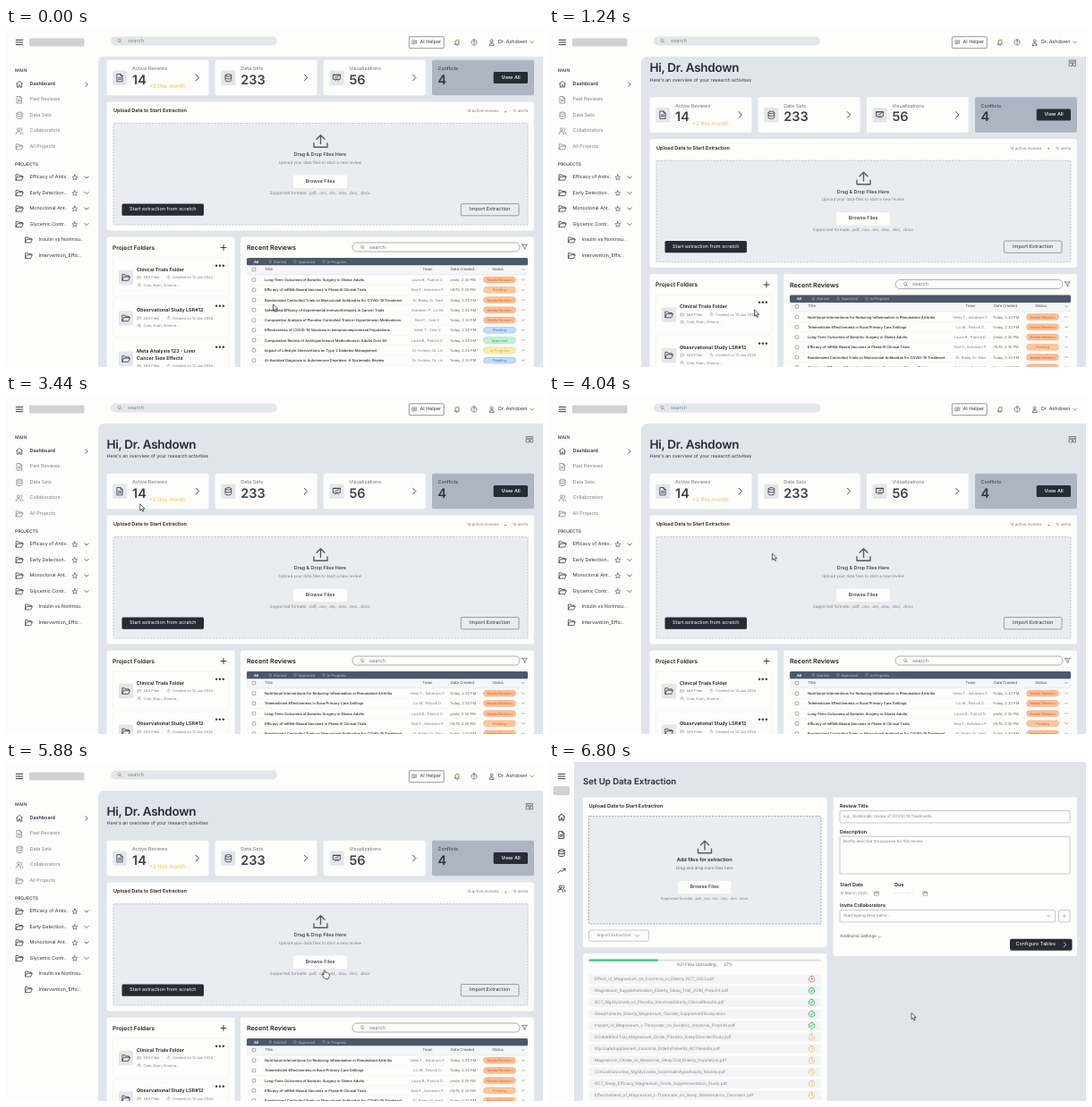
Recreate the animation shown at these times as an HTML page. Size 600 px wide and 379 px high, loop 7.36 s.

```html
<!DOCTYPE html>
<html lang="en">
<head>
<meta charset="utf-8">
<title>Review dashboard</title>
<style>
  html, body { margin: 0; width: 100%; height: 100%; overflow: hidden; background: #fdfdfb; }
  svg { display: block; width: 100vw; height: 100vh; }
  text { font-family: Inter, sans-serif; dominant-baseline: central; text-rendering: geometricPrecision; white-space: pre; }
  .icon { fill: none; stroke-linecap: round; stroke-linejoin: round; }
</style>
</head>
<body>
<svg id="stage" viewBox="0 0 600 379"></svg>
<script>
const WHITE = '#fdfdfb', PANEL = '#e0e5eb', ZONE = '#e9ecf0', DARK = '#262b34', INK = '#2e333b', GREY = '#7b7e83';
const LOOP = 7360;

const ICONS = {
  menu: 'M2 5H22M2 12H22M2 19H22',
  home: 'M3 11 12 3l9 8M5 9.5V21h5v-6h4v6h5V9.5',
  doc: 'M5 2h9l5 5v15H5zM14 2v5h5M8 12h8M8 16h8',
  data: 'M4 5a8 3 0 0 1 16 0a8 3 0 0 1-16 0v14a8 3 0 0 0 16 0V5M4 12a8 3 0 0 0 16 0',
  people: 'M9 11a4 4 0 1 0 0-8a4 4 0 0 0 0 8zM2 21v-2a5 5 0 0 1 5-5h4a5 5 0 0 1 5 5v2M16 3a4 4 0 0 1 0 8M19 14a5 5 0 0 1 3 5v2',
  folder: 'M2 19V4h7l2 3h9v3M2 19l4-9h17l-4 9z',
  star: 'M12 2l3 7 7 .6-5.3 4.8 1.6 7.1L12 17.8l-6.3 3.7 1.6-7.1L2 9.6 9 9z',
  right: 'M8 4l8 8-8 8',
  down: 'M4 8l8 8 8-8',
  search: 'M10 17a7 7 0 1 0 0-14a7 7 0 0 0 0 14zM15 15l6 6',
  chat: 'M3 4h18v13H10l-5 4v-4H3zM8 9h8M8 13h5',
  bell: 'M6 17V10a6 6 0 0 1 12 0v7l2 2H4zM10 22h4',
  help: 'M12 2a10 10 0 1 0 .01 0zM9 9.5a3 3 0 1 1 4.5 2.6q-1.5.9-1.5 2.4M12 17.5v.6',
  user: 'M12 12a4.5 4.5 0 1 0 0-9a4.5 4.5 0 0 0 0 9zM4 21a8 6 0 0 1 16 0z',
  upload: 'M12 16V3M6 9l6-6 6 6M2 15v6h20v-6',
  board: 'M3 4h18v12H3zM2 4h20M8 20l4-4 4 4M8 12l3-3 2 2 3-4',
  layout: 'M2 3h20v5H2zM2 12h9v9H2zM15 12h7v9h-7z',
  trend: 'M2 18l7-7 4 4 9-9M16 6h6v6',
  filter: 'M2 3h20l-8 9v8l-4-3v-5z',
  plus: 'M12 3v18M3 12h18',
  clock: 'M12 2a10 10 0 1 0 .01 0zM12 6v6l4 2',
  check: 'M12 2a10 10 0 1 0 .01 0zM7 12l4 4 6-8',
  calendar: 'M3 5h18v16H3zM3 10h18M8 2v5M16 2v5',
};

// y is the middle of the capitals
const text = (x, y, size, str, color = INK, weight = 400, anchor = 'start', extra = '') =>
  `<text x="${x}" y="${y}" font-size="${size}" fill="${color}" font-weight="${weight}" text-anchor="${anchor}" ${extra}>${str}</text>`;
const centred = (x, y, size, str, color, weight) => text(x, y, size, str, color, weight, 'middle');
const box = (x, y, w, h, fill, r = 0, stroke = 'none', extra = '') =>
  `<rect x="${x}" y="${y}" width="${w}" height="${h}" rx="${r}" fill="${fill}" stroke="${stroke}" stroke-width=".6" ${extra}/>`;
const icon = (name, x, y, size, color = INK, weight = 1.9) =>
  `<path class="icon" d="${ICONS[name]}" stroke="${color}" stroke-width="${weight}" transform="translate(${x} ${y}) scale(${size / 24}) translate(-12 -12)"/>`;
const line = (x1, y, x2, color) => `<path d="M${x1} ${y}H${x2}" stroke="${color}" stroke-width=".5"/>`;
const dropZone = (x, y, w, h, color) => box(x, y, w, h, ZONE, 1, color, 'stroke-dasharray="2 1.5"');
const FORMATS = 'Supported formats: .pdf, .csv, .xls, .xlsx, .doc, .docx';

function header() {
  return icon('menu', 15, 16, 9, INK, 2.6)
    + box(117, 9.5, 186, 10, '#e3e6ea', 5) + icon('search', 127, 14.3, 5.5, '#666') + text(136, 14.3, 5.7, 'search', '#85888d')
    + box(450.3, 9.7, 39, 13, 'none', 1.5, '#555') + icon('chat', 456.5, 16, 6) + text(462.5, 16, 5.4, 'AI Helper')
    + icon('bell', 504, 16, 7.5) + `<circle cx="505.6" cy="13.8" r="1.3" fill="#f0c23c"/>`
    + icon('help', 523, 16, 7.5) + icon('user', 542.7, 16, 8) + text(550, 16, 5.4, 'Dr. Ashdown') + icon('down', 587.5, 16, 5.5, INK, 2.6);
}

function sidebar() {
  const links = [['home', 'Dashboard'], ['doc', 'Past Reviews'], ['data', 'Data Sets'], ['people', 'Collaborators'], ['folder', 'All Projects']];
  const projects = ['Efficacy of Antiv..', 'Early Detection..', 'Monoclonal Ant..', 'Glycemic Contr..'];
  const subs = ['Insulin vs NonInsu..', 'Intervention_Effic..'];
  return text(10, 48.3, 4.9, 'MAIN', '#44484e', 600) + text(10, 153, 4.9, 'PROJECTS', '#44484e', 600)
    + links.map(([name, label], i) => {
        const y = 62.8 + i * 17.5, color = i ? GREY : INK;
        return icon(name, 15, y, 9, color) + text(26.5, y, 5.4, label, color, i ? 400 : 600);
      }).join('') + icon('right', 90, 63, 7, INK, 2.6)
    + projects.map((label, i) => {
        const y = 167 + i * 17.5;
        return icon('folder', 15, y, 9.5) + text(26.5, y, 5.3, label) + icon('star', 76.8, y, 7) + icon('down', 90, y, 6.5, INK, 2.6);
      }).join('')
    + subs.map((label, i) => icon('folder', 25.3, 237 + i * 17.5, 9) + text(36.5, 237 + i * 17.5, 5.4, label)).join('');
}

function statCards() {
  const cards = [['doc', 'Active Reviews', 14], ['data', 'Data Sets', 233], ['board', 'Visualizations', 56]];
  return cards.map(([name, label, count], i) => {
      const x = 112.5 + i * 121.2;
      return box(x, 87.7, 114, 39.5, WHITE, 2) + box(x + 6.7, 99.5, 16, 16.5, '#e3e7ec', 1.5) + icon(name, x + 14.7, 107.7, 10)
        + text(x + 28.5, 98, 5.5, label, '#70747a') + text(x + 28.5, 110, 14.5, count, '#3b424d', 600)
        + icon('right', x + 101.3, 107.5, 10, INK, 2.2);
    }).join('')
    + text(160, 117, 6.3, '+2 this month', '#f3bd4e')
    + box(476, 87.7, 114, 39.5, '#aeb5c2', 2) + text(482.5, 98, 5.4, 'Conflicts') + text(482.5, 110, 14.5, 4, '#2f3641', 600)
    + box(544.7, 101, 38.3, 13, DARK, 1.5) + centred(564, 107.5, 5.5, 'View All', WHITE, 500);
}

function uploadCard() {
  return box(112.5, 134.5, 477.5, 144, WHITE, 3)
    + text(120, 145, 5.5, 'Upload Data to Start Extraction', '#222', 600)
    + text(515, 145.5, 4.4, '14 active reviews', GREY) + centred(558, 145.5, 4.8, '•', '#555') + text(566, 145.5, 4.4, '12 alerts', GREY)
    + dropZone(120, 158.6, 463, 113.4, '#a3a7ad')
    + icon('upload', 351.5, 178.5, 18, '#555b64', 1.8)
    + centred(351, 194, 5.4, 'Drag &amp; Drop Files Here', INK, 500)
    + centred(351, 203, 4.5, 'Upload your data files to start a new review', GREY)
    + box(321, 216.5, 60, 14.5, WHITE, 1.5) + centred(351, 223.7, 5.4, 'Browse Files', INK, 500)
    + centred(350.7, 237, 4.6, FORMATS, GREY)
    + box(129.5, 248.5, 91.5, 13.3, DARK, 1.5) + centred(175.3, 255.2, 5.5, 'Start extraction from scratch', WHITE)
    + box(508.3, 248.5, 64.7, 13.3, 'none', 1.5, '#666') + centred(540.7, 255.2, 5.6, 'Import Extraction');
}

function folderCard() {
  const folders = [['Clinical Trials Folder'], ['Observational Study LSR#12'], ['Meta Analysis 123 - Liver', 'Cancer Side Effects']];
  return box(112.5, 285.5, 143, 200, WHITE, 3) + text(119, 297.5, 6.5, 'Project Folders', '#222', 600) + icon('plus', 243, 297.5, 8, '#222', 2.6)
    + folders.map((lines, i) => {
        const y = 322.7 + i * 45.5, meta = y + 8 * lines.length;
        return box(119.5, y - 14, 129.5, 43, 'none', 2, '#f0f1f2') + centred(239, y - 6, 8, '•••', '#333', 700)
          + box(126, y, 16, 16.5, '#e3e7ec', 1.5) + icon('folder', 134, y + 8.3, 10)
          + lines.map((part, n) => text(146, y + n * 8, 5.45, part, '#222', 600)).join('')
          + icon('folder', 148.8, meta, 4.5, GREY) + text(153.5, meta, 4.1, '345 Files', GREY)
          + icon('clock', 181.5, meta, 4, GREY) + text(186, meta, 4, 'Created on 12 Jan 2024', GREY)
          + icon('people', 148.8, meta + 8.5, 4.5, GREY) + text(153.5, meta + 8.5, 4, 'Cole, Evan, Simone...', GREY);
      }).join('');
}

const PILLS = {
  revision: ['Needs Revision', '#fdbf94', '#cf6527'], late: ['Pending', '#fdc79c', '#cf6527'], pending: ['Pending', '#c3dcfb', '#3f74c4'],
  approved: ['Approved', '#bdf3d3', '#35a56b'], progress: ['In Progress', '#fcecab', '#d6a93a'],
};
const REVIEWS = [
  ['Nutritional Interventions for Reducing Inflammation in Rheumatoid Arthritis', 'Velez T., Ashdown P.', 'Today', 'revision'],
  ['Telemedicine Effectiveness in Rural Primary Care Settings', 'Liv M., Patrick D.', 'Today', 'revision'],
  ['Long-Term Outcomes of Bariatric Surgery in Obese Adults', 'Laura B., Patrick D.', 'yeste', 'revision'],
  ['Efficacy of mRNA-Based Vaccines in Phase III Clinical Trials', 'Ned F., Ashdown P.', '05/15', 'late'],
  ['Randomized Controlled Trials on Monoclonal Antibodies for COVID-19 Treatment', 'Dr. Blake, Dr. Ned', 'Today', 'revision'],
  ['Safety and Efficacy of Experimental Immunotherapies in Cancer Trials', 'Ashdown P., Liv M.', 'Today', 'revision'],
  ['Comparative Analysis of Placebo-Controlled Trials in Hypertension Medications', 'Ned F., Cole V.', 'Today', 'revision'],
  ['Effectiveness of COVID-19 Vaccines in Immunocompromised Populations', 'Velez T., Cole V.', 'Today', 'pending'],
  ['Comparative Review of Antihypertensive Medications in Adults Over 60', 'Laura B., Patrick D.', 'Today', 'approved'],
  ['Impact of Lifestyle Interventions on Type 2 Diabetes Management', 'Dr. Holden, Dr. Liv', 'Today', 'progress'],
  ['AI-Assisted Diagnosis in Autoimmune Disorders: A Systematic Review', 'Dr. Holden, Dr. Liv', 'Today', 'pending'],
];
const checkbox = y => box(275.2, y - 1.8, 3.6, 3.6, 'none', .5, '#777');

function reviewCard() {
  const tab = (name, x, label) => icon(name, x, 313.2, 4, '#b9c1cb') + text(x + 3.7, 313.2, 4, label, '#b9c1cb');
  const rows = REVIEWS.map(([title, team, day, status], i) => {
    const y = 333.6 + i * 11.25, [label, fill, color] = PILLS[status];
    return checkbox(y) + text(289, y, 4, title, '#222', 500) + centred(471, y, 4, team, GREY) + centred(510.5, y, 4, day + ', 2:30 PM', '#666')
      + box(533.5, y - 3.5, 36, 7, fill, 3.5, color, 'stroke-opacity=".35"') + centred(551.5, y, 3.9, label, color)
      + icon('down', 578, y, 4.5, '#555', 2.6) + line(269, y + 5.6, 583, '#eceef0');
  }).join('');
  return box(262, 285.5, 328, 200, WHITE, 3) + text(269, 297.5, 7.2, 'Recent Reviews', '#222', 600)
    + box(387, 292, 187, 10, 'none', 5, '#777') + icon('search', 398.5, 297, 5.5, '#555') + text(406, 297, 5.7, 'search', GREY)
    + icon('filter', 579.5, 297, 7)
    + box(269, 309, 314, 8.5, '#4b586b', 1.5) + text(277, 313.2, 4, 'All', WHITE, 700)
    + tab('star', 295.3, 'Starred') + tab('check', 323, 'Approved') + tab('clock', 355, 'In Progress')
    + box(269, 317.5, 314, 10, '#f5f6f7')
    + checkbox(322) + text(289.5, 322, 4.2, 'Title', '#444') + centred(471, 322, 4.2, 'Team', '#444') + centred(510, 322, 4.2, 'Date Created', '#444')
    + centred(549.5, 322, 4.2, 'Status', '#444') + icon('down', 578, 322, 4.5, '#555', 2.6) + line(269, 327.6, 583, '#dcdfe3')
    + `<g clip-path="url(#tableClip)"><g id="rows">${rows}</g></g>`;
}

function greeting() {
  return text(112.5, 55.7, 13.5, 'Hi, Dr. Ashdown', '#262b34', 600, 'start', 'letter-spacing="-.3"')
    + text(112.5, 69.2, 5.25, "Here's an overview of your research activities", '#333')
    + icon('layout', 585, 49.7, 8.5, '#555');
}

const FILES = [
  'Effect_of_Magnesium_on_Insomnia_in_Elderly_RCT_2023.pdf',
  'Magnesium_Supplementation_Elderly_Sleep_Trial_JGIM_Preprint.pdf',
  'RCT_MgGlycinate_vs_Placebo_InsomniaElderly_ClinicalResults.pdf',
  'SleepPatients_Elderly_Magnesium_Taurate_SupplementStudy.docx',
  'Impact_of_Magnesium_L-Threonate_on_Geriatric_Insomnia_Preprint.pdf',
  'DoubleBlindTrial_Magnesium_Oxide_Placebo_SleepDisorderStudy.pdf',
  'GlycinateSupplement_Insomnia_ElderlyPatients_RCTResults.pdf',
  'Magnesium_Citrate_vs_Melatonin_SleepTrial_Elderly_Population.pdf',
  'ClinicalOutcomes_MgGlycinate_InsomniaInAgedAdults_Review.pdf',
  'RCT_Sleep_Efficacy_Magnesium_Oxide_Supplementation_Study.pdf',
  'Effectiveness_of_Magnesium_L-Threonate_on_Sleep_Maintenance_Disorders.pdf',
];

function uploadPage() {
  const files = FILES.map((name, i) => {
    const y = 242.6 + i * 13;
    const status = i == 0 ? icon('clock', 293.5, y, 8, '#d9707a', 2.4) : i < 5 ? icon('check', 293.5, y, 8, '#2fb866', 2.6) : icon('clock', 293.5, y, 8, '#efb84f', 2.2);
    return box(44.5, y - 5.2, 259.5, 10.4, '#f3f4f5', 1) + text(51, y, 4.65, name, '#85888d') + status;
  }).join('');
  return text(38, 22.5, 9.6, 'Set Up Data Extraction', '#262b34', 600)
    + box(38, 39.5, 272.5, 167.7, WHITE, 3) + text(44.5, 50, 5.55, 'Upload Data to Start Extraction', '#222', 600)
    + dropZone(44.5, 60.6, 259.5, 120.4, '#6c7076')
    + icon('upload', 174, 95, 18, '#555b64', 1.8)
    + centred(173.7, 110.3, 5.6, 'Add files for extraction', '#222', 600) + centred(173.7, 119, 4.5, 'Drag and drop more files here', '#666')
    + box(144, 133, 59.5, 14.3, WHITE, 1.5) + centred(173.7, 140.2, 5.4, 'Browse Files', INK, 500)
    + centred(173.5, 152.6, 4, FORMATS, GREY)
    + box(44.5, 188, 67, 12.3, 'none', 2, '#a5a8ad') + text(53.5, 194.2, 4.7, 'Import Extraction', GREY) + icon('down', 98.5, 194.2, 6.5, '#777', 2.4)
    + box(38, 214, 272.5, 200, WHITE, 3) + box(44.5, 220.5, 259.5, 2.3, '#dfe2e5', 1.1) + box(44.5, 220.5, 77.5, 2.3, '#41c77f', 1.1)
    + text(143, 227.3, 4.75, 'Files Uploading...'.replace(/^/, '921 '), '#666') + text(195, 227.3, 4.75, '37%', '#666')
    + files;
}

function detailsCard() {
  const heading = (x, y, str) => text(x, y, 5.4, str, '#222', 600);
  const field = (y, w, h) => box(325, y, w, h, 'none', 1, '#a2a5aa');
  return box(317.5, 39.5, 272.5, 177.5, WHITE, 3)
    + heading(325, 49.5, 'Review Title') + field(54.5, 257, 13.5) + text(329, 61.3, 4.35, 'e.g., Systematic review of COVID-19 Treatments', GREY)
    + heading(325, 78.5, 'Description') + field(83.2, 257, 41.8) + text(329, 89.7, 4.35, 'Briefly describe the purpose for this review', GREY)
    + heading(325, 138, 'Start Date') + heading(386, 138, 'Due')
    + text(325, 147, 4.4, '12 March 2025', GREY) + icon('calendar', 366, 147, 6, '#666')
    + text(386, 147, 4.4, '-- --- ----', '#aaa') + icon('calendar', 420.5, 147, 6, '#666')
    + heading(325, 160.7, 'Invite Collaborators') + field(165.6, 240.5, 13.3) + text(329, 172.2, 4.5, 'Start typing their name...', GREY)
    + icon('down', 558.5, 172.2, 5, '#666', 2.4) + box(569.5, 165.6, 12.5, 13.3, 'none', 1, '#a2a5aa') + icon('plus', 575.8, 172.2, 4.5, '#666')
    + text(325, 195.5, 4.6, 'Additional Settings', '#555') + icon('down', 369, 195.5, 4.5, '#555', 2.6)
    + box(515, 197.7, 69.5, 13, DARK, 2) + text(521.5, 204.2, 5.5, 'Configure Tables', WHITE) + icon('right', 576.5, 204.2, 7.5, WHITE, 2.4);
}

const rail = () => icon('menu', 14, 16, 9, INK, 2.6)
  + ['home', 'doc', 'data', 'trend', 'people'].map((name, i) => icon(name, 14, 61.6 + i * 20, 9.5, '#222', 2.1)).join('');

const $ = id => document.getElementById(id);
$('stage').innerHTML = `
  <defs>
    <clipPath id="pageClip"><rect x="103" y="32" width="497" height="347" rx="0"/></clipPath>
    <clipPath id="tableClip"><rect x="262" y="327.8" width="328" height="200"/></clipPath>
    <clipPath id="sideClip"><rect id="sideWidth" y="32" width="103" height="347"/></clipPath>
  </defs>
  ${box(0, 0, 600, 379, WHITE)}${header()}
  ${box(103, 32, 510, 360, PANEL, 6)}
  <g clip-path="url(#pageClip)"><g id="page">${greeting()}${statCards()}${uploadCard()}${folderCard()}${reviewCard()}</g></g>
  <g clip-path="url(#sideClip)">${sidebar()}</g>
  <g id="setup">${box(0, 0, 600, 379, WHITE)}${box(28, 0, 572, 379, PANEL)}${rail()}${uploadPage()}${detailsCard()}</g>
  <rect id="logo" rx="1.5" fill="#d0d1d2"/>
  <path id="cursor" fill="#fff" stroke="#30343a" stroke-width=".8" stroke-linejoin="round"/>`;

const ARROW = 'M0 0V7.2L1.7 5.7 2.9 8.3 4.1 7.8 2.9 5.2H5.3Z';
const HAND = 'M0 0Q-.9 0-.9.9V5L-1.9 4Q-2.7 3.4-3.1 4.2L-.9 8Q-.3 9.2.7 9.6H3.8Q5.2 8.2 5.2 6.2V4.2Q5.1 3.4 4.3 3.5 4.2 2.7 3.3 2.9 3.1 2.1 2.2 2.6 2 2.2.9 2.4V.9Q.9 0 0 0Z';

// [time, value...], each held until the next
const PAGE_SCROLL = [[0, 52], [1040, 44], [1140, 28], [1240, 10.5], [1400, 0]];
const TABLE_SCROLL = [[0, 22.5], [280, 16], [400, 7], [520, 0]];
const POINTER = [[0, 298.5, 309], [520, 229.5, 315], [1560, 229, 310], [1720, 228.5, 305], [3160, 122, 111],
  [4480, 312, 212], [5240, 350, 228], [5760, 353, 231], [5880, 356, 233], [6200, 361, 237], [6240, 363.5, 239],
  [6280, 366, 241.5], [6360, 372, 245], [6440, 380, 250], [6600, 391, 258], [6800, 405, 280.5]];

const hold = (keys, t) => keys.filter(key => key[0] <= t).pop().slice(1);
const mix = (a, b, p) => a + (b - a) * p;
const smooth = (t, from, to) => {
  const u = Math.min(1, Math.max(0, (t - from) / (to - from)));
  return u * u * (3 - 2 * u);
};

function draw(now) {
  const t = Math.floor(now % LOOP / 40) * 40;
  $('page').setAttribute('transform', `translate(0 ${-hold(PAGE_SCROLL, t)[0]})`);
  $('rows').setAttribute('transform', `translate(0 ${-hold(TABLE_SCROLL, t)[0]})`);

  const fade = smooth(t, 6170, 6450);
  $('setup').setAttribute('opacity', fade);
  $('sideWidth').setAttribute('width', mix(103, 28, fade));
  const logo = { x: mix(26, 5, fade), y: mix(11.5, 27, fade), width: mix(61.5, 18, fade), height: mix(9, 10, fade) };
  for (const name in logo) $('logo').setAttribute(name, logo[name]);

  let [x, y] = hold(POINTER, t);
  if (t >= 3440 && t < 4480) {
    const p = smooth(t, 3440, 4480);
    x = mix(149.8, 312, p);
    y = mix(121.8, 212, p);
  }
  $('cursor').setAttribute('d', t >= 4440 && t < 6200 ? HAND : ARROW);
  $('cursor').setAttribute('transform', `translate(${x} ${y})`);
}

let start;
function tick(now) {
  start ??= now;
  draw(now - start);
  requestAnimationFrame(tick);
}
draw(0);
requestAnimationFrame(tick);
</script>
</body>
</html>
```
